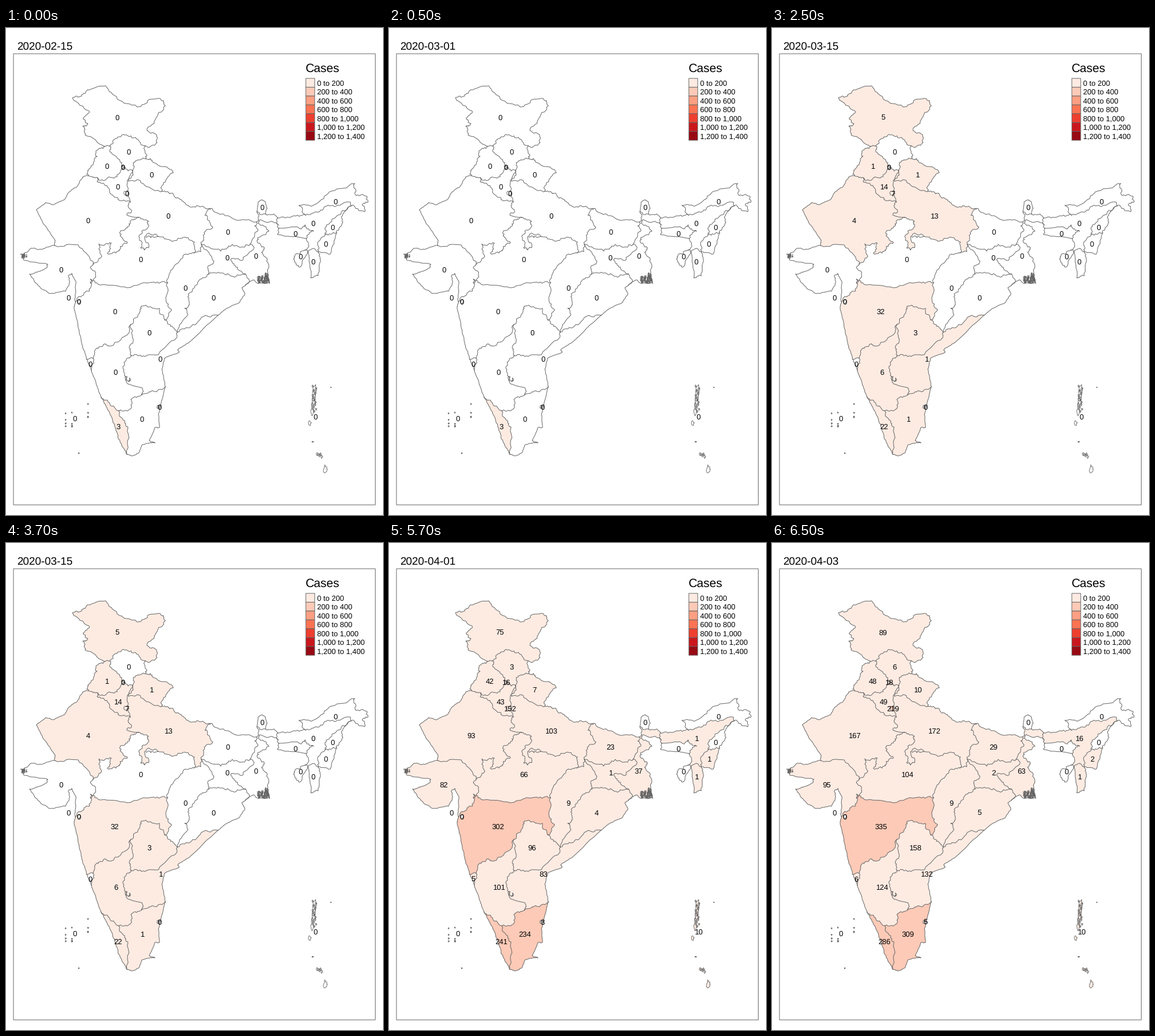
Write a matplotlib script that moves like this. It is 658 px wide and 851 px high and loops after 8000 ms.

```python
import numpy as np
import matplotlib.pyplot as plt
from matplotlib.animation import FuncAnimation
from matplotlib.patches import Polygon, Rectangle

W, H, DPI = 658, 851, 100
PX = 72 / DPI
GREY = "#666666"
REDS = ["#fdebe2", "#fccab7", "#fc9f82", "#fb7353", "#ee3f2f", "#c9171d", "#980a13"]
DATES = ["2020-02-15", "2020-03-01", "2020-03-15", "2020-04-01", "2020-04-03"]
STARTS = [0, 1, 5, 9, 13]  # first tick of each date, one tick = 500 ms

plt.rcParams.update({"font.family": "Liberation Sans", "text.hinting": "none",
                     "text.hinting_factor": 1})
rng = np.random.RandomState(4)
fig = plt.figure(figsize=(W / DPI, H / DPI), dpi=DPI, facecolor="white")
ax = fig.add_axes([0, 0, 1, 1])
ax.set(xlim=(0, W), ylim=(H, 0))
ax.axis("off")

borders, states = {}, []


def write(x, y, text, size, **kw):
    return ax.text(x, y, text, fontsize=size * PX, va="baseline", zorder=5, **kw)


def box(x, y, w, h, color):
    ax.add_patch(Rectangle((x, y), w, h, fc=color, ec=GREY, lw=PX, snap=False, zorder=4))


def stroke(pts, width=1.0):
    ax.plot(*np.transpose(pts), color=GREY, lw=width * PX, zorder=3, solid_joinstyle="round")


def roughen(pts, reach):
    """Midpoint displacement down to steps of about 3 px, never further than reach."""
    while np.hypot(*np.diff(pts, axis=0).T).mean() > 4:
        step = np.diff(pts, axis=0)
        length = np.hypot(*step.T)[:, None] + 1e-6
        normal = np.column_stack([-step[:, 1], step[:, 0]]) / length
        shift = rng.uniform(-1, 1, length.shape) * np.minimum(0.36 * length, reach)
        merged = np.empty((2 * len(pts) - 1, 2))
        merged[::2], merged[1::2] = pts, pts[:-1] + step / 2 + normal * shift
        pts = merged
    return pts


def border(name, *coords, reach=2.3):
    borders[name] = roughen(np.reshape(coords, (-1, 2)).astype(float), reach)
    stroke(borders[name])


def coast(name, *coords):
    border(name, *coords, reach=0.7)


def ring(names):
    """Chain borders head to tail into one closed outline."""
    first, *rest = [borders[n] for n in names.split()]
    gap = lambda p, q: np.hypot(*(p - q))
    if rest and min(gap(first[0], rest[0][k]) for k in (0, -1)) < 1:
        first = first[::-1]
    for part in rest:
        flip = gap(part[-1], first[-1]) < gap(part[0], first[-1])
        first = np.vstack([first, part[::-1] if flip else part])
    return first


def blob(x, y, rx, ry):
    a = np.linspace(0, 2 * np.pi, 12)
    r = rng.uniform(0.6, 1.15, 12)
    r[-1] = r[0]
    pts = np.column_stack([x + rx * r * np.cos(a), y + ry * r * np.sin(a)])
    stroke(pts, 0.9)
    return pts


def scribble(x0, y0, x1, y1, n):
    """Dense creeks and inlets, swept from left to right."""
    x = np.linspace(x0, x1, n) + rng.uniform(-2, 2, n)
    stroke(np.column_stack([x, rng.uniform(y0, y1, n)]))


def state(x, y, outline="", mid_march=0, april_1=0, april_3=0, start=0, islands=()):
    rings = ([ring(outline)] if outline else []) + list(islands)
    patches = [ax.add_patch(Polygon(r, ec="none", zorder=1)) for r in rings]
    label = write(x, y + 4.6, "", 12.8, ha="center")
    states.append(((start, start, mid_march, april_1, april_3), patches, label))


# North: key points only, the jagged detail comes from roughen
border("jk", 243, 206, 261, 203, 263, 190, 246, 179, 262, 157, 278, 136, 275, 127, 250, 125,
       229, 138, 194, 124, 174, 101, 142, 108, 132, 119, 116, 122, 145, 145, 135, 157, 143, 167,
       134, 172, 138, 187, 172, 207)
border("jk_hp", 243, 206, 228, 194, 207, 187, 189, 195, 181, 206)
border("jk_pb", 181, 206, 172, 207)
border("hp", 243, 206, 246, 222, 244, 228)
border("hp_uk", 244, 228, 226, 232, 221, 249)
border("hp_hr", 221, 249, 213, 250, 206, 243)
border("hp_pb", 206, 243, 196, 229, 181, 213, 181, 206)
border("pb", 172, 207, 158, 214, 159, 224, 145, 246, 144, 258)
border("pb_rj", 144, 258, 160, 262)
border("pb_hr", 160, 262, 173, 266, 194, 260, 206, 243)
border("hr_rj", 160, 262, 159, 268, 176, 275, 187, 293, 199, 302, 217, 304)
border("hr_up", 221, 249, 212, 266, 213, 288, 217, 304, reach=1)
border("uk", 244, 228, 252, 228, 257, 235, 292, 253, 275, 270, 272, 285)
border("uk_up", 221, 249, 222, 257, 214, 268, 230, 265, 256, 282, 272, 285)

# Rajasthan and the Gangetic plain
coast("rj", 144, 258, 134, 260, 124, 277, 111, 286, 102, 300, 82, 309, 69, 305, 53, 318,
      66, 343, 85, 370, 85, 380)
border("rj_gj", 85, 380, 126, 379, 152, 408, 152, 413)
border("rj_mp", 152, 413, 165, 402, 162, 377, 184, 376, 177, 394, 196, 390, 199, 382, 212, 375,
       199, 363, 199, 357, 215, 346, 221, 335, 232, 331)
border("rj_up", 217, 304, 213, 310, 219, 322, 211, 327, 232, 331)
border("up_mp", 232, 331, 249, 338, 248, 348, 234, 361, 235, 384, 242, 388, 249, 384, 242, 368,
       246, 360, 268, 365, 293, 372, 309, 366, 329, 374, 328, 393)
border("up", 272, 285, 288, 289, 318, 310, 357, 316)
border("up_br", 357, 316, 347, 327, 361, 348, 346, 357, 341, 378)
border("up_cg", 341, 378, 340, 391, 328, 393)
border("br", 357, 316, 365, 322, 400, 335, 437, 339)
border("br_wb", 437, 339, 434, 346, 440, 353, 434, 360, 426, 378)
border("br_jh", 426, 378, 416, 383, 388, 381, 375, 390, 341, 378)
border("jh_wb", 426, 378, 433, 384, 414, 405, 392, 405, 404, 418, 418, 430)
border("jh_od", 418, 430, 396, 434, 376, 428, 354, 430)
border("jh_cg", 341, 378, 363, 408, 352, 420, 354, 430)

# East
border("wb_n", 437, 339, 440, 331, 438, 321)
border("wb_sk", 438, 321, 445, 326, 453, 325)
border("sk", 438, 321, 440, 304, 447, 300, 453, 304, 456, 315, 453, 325, reach=1)
border("wb_bt", 453, 325, 474, 332)
border("wb_as", 474, 332, 475, 344)
border("wb", 475, 344, 444, 335, 440, 341, 459, 355, 440, 366, 438, 372, 451, 384, 446, 392,
       457, 410, 459, 445)
border("wb_sea", 459, 445, 439, 446, 432, 440, 418, 449, reach=1)
border("wb_od", 418, 449, 425, 441, 418, 430)
coast("od", 418, 449, 412, 455, 417, 464, 407, 480, 385, 490, 370, 502)
border("od_ap", 370, 502, 345, 504, 320, 524, 299, 531)
border("od_cg", 354, 430, 337, 441, 318, 465, 320, 484, 312, 490, 317, 502, 299, 531)

# West and centre
border("gj", 85, 380, 62, 387, 42, 386, 28, 397, 32, 406, 73, 413, 71, 419, 54, 427, 41, 430,
       56, 450, 77, 464, 104, 460, 111, 442, 109, 433, 115, 429, 122, 446, 121, 478, reach=1)
border("gj_mp", 152, 413, 149, 421, 156, 430, 148, 446)
border("gj_mh", 148, 446, 146, 459, 136, 463, 121, 478)
border("mp_mh", 148, 446, 147, 439, 165, 449, 212, 454, 258, 444, 282, 445)
border("mp_cg", 282, 445, 285, 430, 303, 407, 309, 398, 328, 393)
border("mh_cg", 282, 445, 280, 480, 289, 492, 277, 510)
border("mh_tg", 277, 510, 268, 490, 236, 486, 234, 495, 218, 518)
border("cg_tg", 277, 510, 299, 531)
coast("mh", 121, 478, 119, 488, 131, 545, 141, 579)
border("mh_ka", 218, 518, 215, 532, 182, 556, 170, 553, 157, 561, 152, 577)
border("mh_ga", 152, 577, 141, 579)
coast("ga", 141, 579, 149, 598)
border("ga_ka", 152, 577, 149, 598)

# South
coast("ka", 149, 598, 157, 620, 166, 645)
border("ka_kl", 166, 645, 197, 669)
border("ka_tn", 197, 669, 219, 663, 218, 649, 237, 641)
border("ka_ap", 237, 641, 239, 633, 210, 619, 205, 600, 210, 580, 218, 572)
border("ka_tg", 218, 518, 222, 548, 215, 558, 218, 572)
border("tg_ap", 218, 572, 243, 574, 266, 571, 298, 541, 299, 531)
coast("ap", 370, 502, 319, 550, 300, 562, 302, 567, 277, 577, 272, 596, 278, 627)
border("ap_tn", 278, 627, 252, 636, 237, 641)
coast("tn", 278, 627, 266, 675, 268, 698, 260, 698, 250, 721, 260, 725, 238, 728, 231, 743, 220, 748, 211, 745)
border("kl_tn", 197, 669, 207, 690, 213, 698, 211, 745)
coast("kl", 166, 645, 185, 681, 197, 719, 211, 745)

# North-east
border("as", 474, 332, 500, 329, 523, 327)
border("as_ar", 523, 327, 545, 322, 565, 311, 600, 304, 602, 311)
border("as_nl", 602, 311, 560, 344, 557, 361)
border("as_mn", 557, 361, 544, 379, 545, 391)
border("as_mz", 545, 391, 537, 385, 527, 391)
border("as_tr", 527, 391, 522, 388)
border("as_bd", 522, 388, 528, 378, 524, 368)
border("as_ml", 524, 368, 537, 355, 522, 344, 512, 350, 476, 350)
border("as_w", 476, 350, 475, 344)
border("ml", 476, 350, 474, 361, 524, 368, reach=1.2)
border("ar", 523, 327, 511, 310, 545, 305, 568, 285, 609, 272, 609, 290, 630, 294, 632, 304,
       622, 310, 626, 321, 602, 311)
border("nl", 602, 311, 588, 325, 586, 344, 577, 358)
border("nl_mn", 577, 358, 557, 361)
border("mn", 577, 358, 566, 395, 545, 391, reach=1.2)
border("mz", 545, 391, 549, 405, 545, 433, 532, 437, 527, 391, reach=1.5)
border("tr", 522, 388, 504, 398, 503, 406, 513, 418, 527, 391)

# Ragged coasts
scribble(27, 394, 35, 403, 26)
scribble(439, 432, 459, 447, 60)
scribble(450, 427, 458, 445, 25)
scribble(246, 363, 264, 367, 10)
scribble(208, 609, 218, 618, 12)

# Label position, outline, then the counts
state(194, 156, "jk jk_hp jk_pb", 5, 75, 89)
state(214, 216, "jk_hp hp hp_uk hp_hr hp_pb", 0, 3, 6)
state(176, 241, "jk_pb hp_pb pb_hr pb_rj pb", 1, 42, 48)
state(254, 256.5, "hp_uk uk uk_up", 1, 7, 10)
state(195, 277, "pb_hr hp_hr hr_up hr_rj", 14, 43, 49)
state(143.5, 336, "rj pb_rj hr_rj rj_up rj_mp rj_gj", 4, 93, 167)
state(283, 328, "uk_up up up_br up_cg up_mp rj_up hr_up", 13, 103, 172)
state(387, 356, "br br_wb br_jh up_br", 0, 23, 29)
state(386.5, 401, "br_jh jh_wb jh_od jh_cg", 0, 1, 2)
state(436, 398, "wb_n wb_sk wb_bt wb_as wb wb_sea wb_od jh_wb br_wb", 0, 37, 63)
state(447, 313.5, "sk wb_sk")
state(536.5, 341, "as as_ar as_nl as_mn as_mz as_tr as_bd as_ml as_w wb_as", 0, 1, 16)
state(505, 359, "as_ml ml")
state(575.5, 303.5, "as_ar ar")
state(570.5, 348, "as_nl nl nl_mn")
state(558.5, 377, "as_mn nl_mn mn", 0, 1, 2)
state(536.5, 408.5, "as_mz mz", 0, 1, 1)
state(514, 399.5, "tr as_tr")
state(96, 422.5, "gj rj_gj gj_mp gj_mh", 0, 82, 95)
state(235.5, 404, "rj_mp up_mp mp_cg mp_mh gj_mp", 0, 66, 104)
state(313, 454.5, "mp_cg up_cg jh_cg od_cg cg_tg mh_cg", 0, 9, 9)
state(362.5, 471, "jh_od wb_od od od_ap od_cg", 0, 4, 5)
state(190, 495.5, "gj_mh mp_mh mh_cg mh_tg mh_ka mh_ga mh", 32, 302, 335)
state(250, 532, "mh_tg cg_tg tg_ap ka_tg", 3, 96, 158)
state(269.5, 578, "tg_ap od_ap ap ap_tn ka_ap", 1, 83, 132)
state(191.5, 601.5, "mh_ka ka_tg ka_ap ka_tn ka_kl ka ga_ka", 6, 101, 124)
state(147, 587, "mh_ga ga_ka ga", 0, 5, 6)
state(196, 696.5, "kl ka_kl kl_tn", 22, 241, 286, start=3)
state(237.5, 683.5, "ka_tn ap_tn tn kl_tn", 1, 234, 309)
state(204, 243.5, "", 0, 16, 18, islands=[blob(204, 243, 3, 4)])
state(211, 289.5, "", 7, 152, 219, islands=[blob(210, 289, 4.5, 5)])
state(109, 471)
state(127, 478.5, islands=[blob(127, 478, 3, 4)])
state(268, 662.5, "", 0, 3, 5, islands=[blob(x, 662, 2, 3) for x in (265, 267)])

reefs = [blob(x, y, 1, 1.2) for x in (104, 115, 143) for y in rng.uniform(655, 703, 4)]
state(120.5, 682, islands=reefs + [blob(127, 743, 1, 1)])

chain = [blob(539 - 0.11 * k, 630 + k, 3, 7) for k in range(0, 42, 8)]
chain += [blob(538 + rng.uniform(-4, 4), 626 + k, 1.2, 2) for k in range(0, 48, 4)]
chain += [blob(530, 690, 2.5, 4.5), blob(557, 771, 3, 7), blob(535, 723, 1.5, 1), blob(567, 628, 0.6, 0.6)]
chain += [blob(x, 747 + rng.uniform(-5, 3), 1.5, 2.5) for x in range(543, 553, 2)]
state(540, 679.5, "", 0, 10, 10, islands=chain)

# Frame, heading and legend
box(13, 45, 631.5, 788.3, "none")
date = write(19.5, 37.8, "", 19.2)
write(522.5, 76.5, "Cases", 21)
for i, color in enumerate(REDS):
    top = 88 + 15.45 * i
    box(523.3, top, 15.5, 15.45, color)
    write(543, top + 12.5, f"{200 * i:,} to {200 * i + 200:,}", 12.75)


def update(tick):
    stage = sum(tick >= s for s in STARTS) - 1
    date.set_text(DATES[stage])
    for counts, patches, label in states:
        n = counts[stage]
        label.set_text(str(n))
        for patch in patches:
            patch.set_facecolor(REDS[n // 200] if n else "white")
    return []


anim = FuncAnimation(fig, update, frames=16, interval=500, repeat=True, repeat_delay=0)
plt.show()
```
